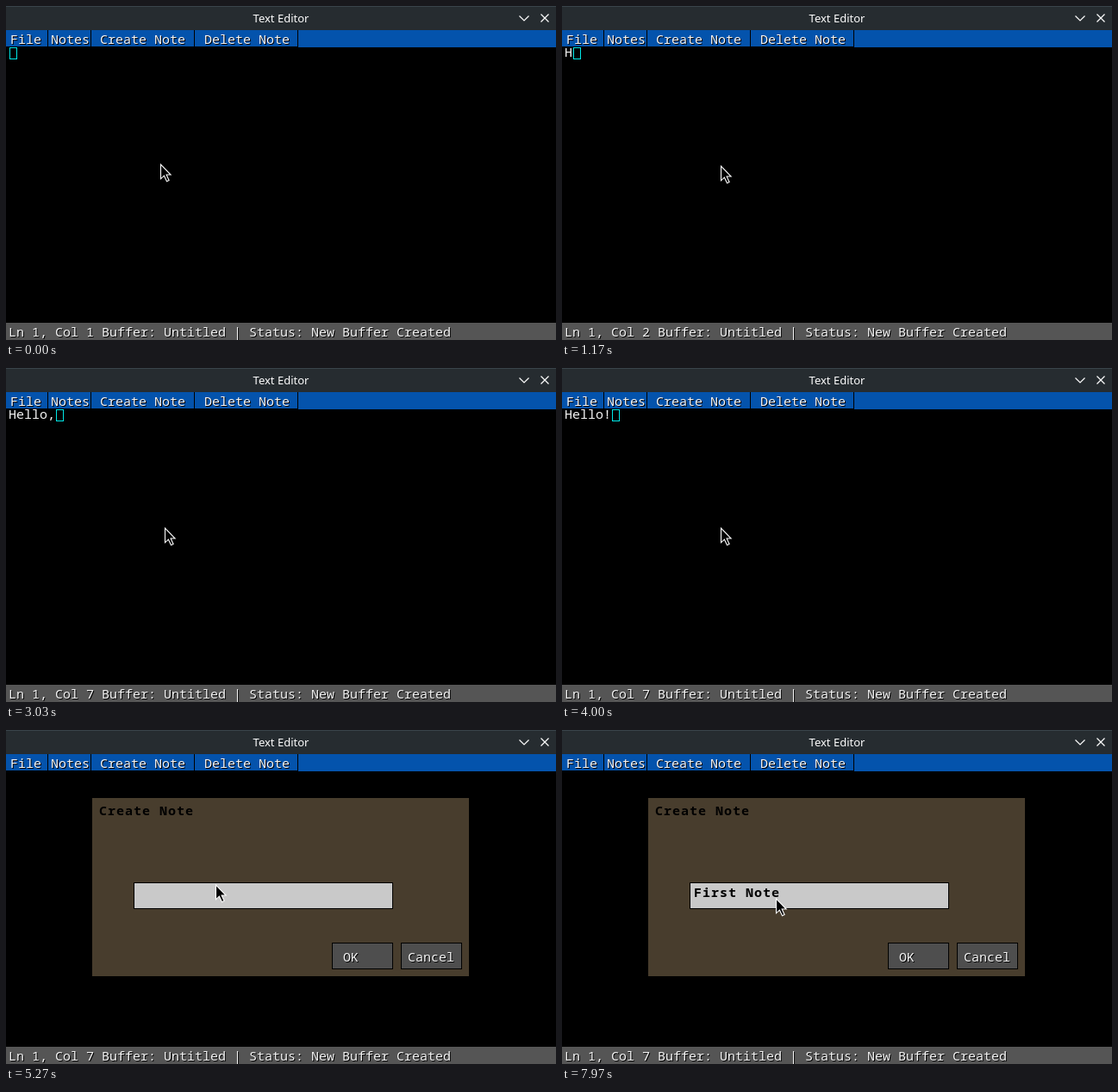
An HTML page that plays this animation: 638x388 px, repeating every 8000 ms.

```html
<!DOCTYPE html>
<html lang="en">
<head>
<meta charset="utf-8">
<title>Text Editor</title>
<style>
  html, body { margin: 0; width: 100%; height: 100%; overflow: hidden; background: #000; }
  svg { display: block; width: 638px; height: 388px; }
  text { font: 15px "Noto Sans Mono", monospace; fill: #f4f4f4; white-space: pre; }
  .title { font: 13px "Noto Sans", sans-serif; fill: #fcfcfc; text-anchor: middle; }
  .bold { font-weight: 700; letter-spacing: 1px; fill: #000; }
  .shade { filter: drop-shadow(1px 1px 0 #000); }
  .line { fill: none; stroke: #fcfcfc; stroke-width: 1.2; }
  .box { stroke: #000; }
</style>
</head>
<body>
<svg viewBox="0 0 638 388">
  <rect width="638" height="388"/>
  <rect width="638" height="28" fill="#262c30"/>
  <rect width="638" height="1" fill="#3a444a"/>
  <text class="title" x="319" y="19">Text Editor</text>
  <path class="line" d="M595.5 11.5l5.5 5.5 5.5-5.5M620.5 9.5l9 9m0-9l-9 9"/>

  <rect y="28" width="638" height="20" fill="#0453ac"/>
  <rect id="hover" x="99" y="28" width="119" height="19" fill="#888"/>
  <path d="M48.5 28v19M98.5 28v19M218.5 28v19M338.5 28v19M0 47.5h339" stroke="#000"/>
  <g class="shade">
    <text x="5" y="44">File</text>
    <text x="52" y="44">Notes</text>
    <text x="109" y="44">Create Note</text>
    <text x="230" y="44">Delete Note</text>
  </g>

  <g id="page">
    <text id="body" x="3" y="59"></text>
    <rect id="caret" x="4.5" y="48.5" width="8" height="13" fill="none" stroke="#00e8e8"/>
  </g>

  <rect y="368" width="638" height="20" fill="#555"/>
  <text id="status" class="shade" x="3" y="384"></text>

  <g id="dialog">
    <rect class="box" x="99.5" y="78.5" width="438" height="208" fill="#483d2d"/>
    <text class="bold" x="108" y="99">Create Note</text>
    <rect class="box" x="148.5" y="177.5" width="300" height="30" fill="#c9c9c9"/>
    <text id="field" class="bold" x="153" y="194"></text>
    <g fill="#4e4e4e">
      <rect class="box" x="378.5" y="247.5" width="70" height="30"/>
      <rect class="box" x="458.5" y="247.5" width="70" height="30"/>
    </g>
    <g class="shade">
      <text x="391" y="269">OK</text>
      <text x="466" y="269">Cancel</text>
    </g>
  </g>

  <path id="mouse" d="M0 0V16.8L3.9 13.2L7 19.8L9.6 18.6L6.6 12H11.6Z"
        fill="#000" stroke="#fcfcfc" stroke-width="1.1"/>
</svg>
<script>
const LOOP = 8000, OPEN = 4900;
const $ = id => document.getElementById(id);

// Each entry holds from its time until the next one.
const bodyKeys = [[0, ""], [1000, "H"], [1420, "He"], [1570, "Hel"], [1730, "Hell"],
  [1900, "Hello"], [2270, "Hello,"], [3500, "Hello"], [3850, "Hello!"]];
const fieldKeys = [[0, ""], ...[..."First Note"].map((c, i) =>
  [6500 + i * 145, "First Note".slice(0, i + 1)])];

// Pointer moves: start, end, x, y reached
const moves = [[0, 0, 179.5, 184], [250, 700, 184.5, 186], [4150, 4600, 170.5, 42],
  [4930, 5270, 243.5, 180], [5270, 5550, 248.5, 196]];

const held = (keys, t) => keys.filter(k => k[0] <= t).pop()[1];
const ease = p => p * p * (3 - 2 * p);
const show = (id, on) => $(id).style.display = on ? "" : "none";

function pointer(t) {
  let [, , x, y] = moves[0];
  for (const [a, b, tx, ty] of moves.slice(1)) {
    const p = ease(Math.min(1, Math.max(0, (t - a) / (b - a))));
    x += (tx - x) * p;
    y += (ty - y) * p;
  }
  return [x, y];
}

function draw(t) {
  const body = held(bodyKeys, t), [x, y] = pointer(t);
  $("body").textContent = body;
  $("caret").setAttribute("x", 4.5 + 9 * body.length);
  $("status").textContent =
    `Ln 1, Col ${body.length + 1} Buffer: Untitled | Status: New Buffer Created`;
  $("field").textContent = held(fieldKeys, t);
  $("mouse").setAttribute("transform", `translate(${x} ${y})`);
  show("page", t < OPEN);
  show("dialog", t >= OPEN);
  show("hover", t < OPEN && y < 48 && x >= 99 && x < 218);
}

const start = performance.now();
function tick() {
  draw((performance.now() - start) % LOOP);
  requestAnimationFrame(tick);
}
draw(0);
requestAnimationFrame(tick);
</script>
</body>
</html>
```
